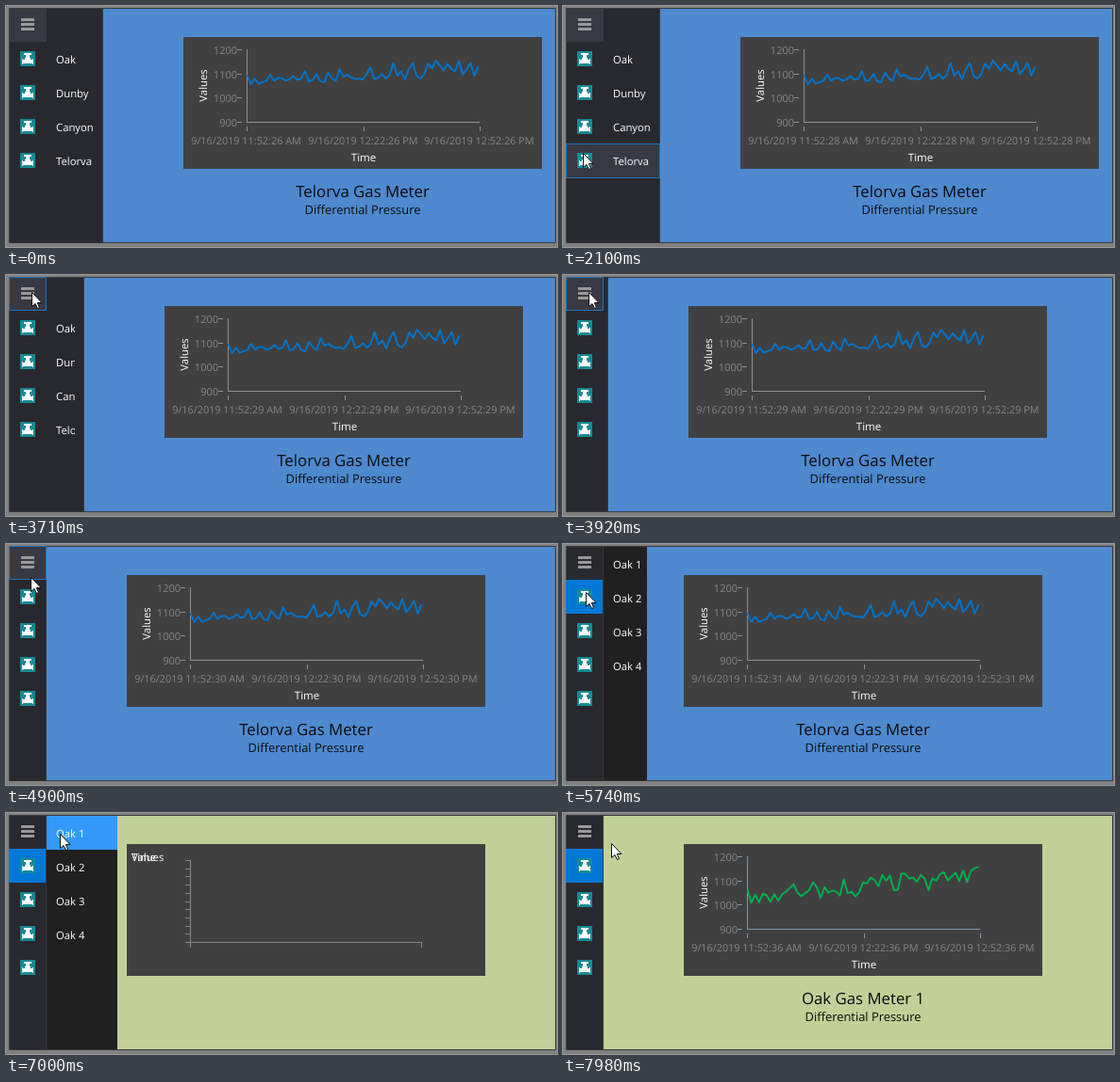
Write an HTML page with a canvas that moves like this. It is 584 px wide and 256 px high and loops after 8 s.

```html
<!DOCTYPE html>
<html lang="en">
<head>
<meta charset="utf-8">
<title>Gas meter dashboard</title>
<style>
html, body { margin: 0; width: 100%; height: 100%; overflow: hidden; background: #808080; }
canvas { display: block; width: 584px; height: 256px; }
</style>
</head>
<body>
<canvas id="stage" width="584" height="256"></canvas>
<script>
const ctx = document.getElementById('stage').getContext('2d');
ctx.textRendering = 'geometricPrecision';

const LOOP = 8000, STEP = 70;
const FONT = '"Open Sans", "Noto Sans", sans-serif';
const SITES = ['Oak', 'Dunby', 'Canyon', 'Telorva'];
const ROW = 36, RAIL = 43, WIDE = 103, MENU = 75;
const BLUE = '#0078d7', GREY = '#868686';

// Times of the events, in ms
const ENTER = 1890, COLLAPSE = 3640, SELECT = 5460, OPEN = 5530, PRESS = 7000, LOAD = 7140;

// Pointer moves: start, end, target x, target y
const MOVES = [
  [1890, 2100, 21, 156], [2100, 2730, 38, 56], [2730, 3360, 27, 18],
  [4620, 5180, 24, 51], [5950, 6440, 57, 22], [7840, 7980, 51, 32],
];

const mix = (a, b, u) => a + (b - a) * u;
const progress = (t, start, length) => Math.min(1, Math.max(0, (t - start) / length));

// One sample per minute: a rising trend with seeded noise
function samples(seed, from, to, calm, wild) {
  return Array.from({ length: 61 }, (_, i) => {
    seed = (seed * 16807) % 2147483647;
    const u = i / 60, noise = seed / 2147483647 * 2 - 1;
    return mix(from, to, u) + noise * mix(calm, wild, u);
  });
}
const BLUE_DATA = samples(4127, 79, 64, 6, 11);
const GREEN_DATA = samples(911, 90, 66, 9, 12);

function pointerAt(t) {
  let x = 5, y = 167;
  for (const [start, end, tx, ty] of MOVES) {
    const u = progress(t, start, end - start);
    x = mix(x, tx, u);
    y = mix(y, ty, u);
  }
  return { x: Math.round(x), y: Math.round(y), shown: t >= ENTER };
}

function sideEdge(t) {
  return Math.round(mix(RAIL, WIDE, (1 - progress(t, COLLAPSE, 420)) ** 2.25));
}

function menuEdge(t) {
  const open = progress(t, OPEN, 280) ** 1.7;
  const close = progress(t, LOAD, 280) ** 1.7;
  return Math.round(RAIL + MENU * (open - close));
}

function rect(x, y, w, h, color) {
  ctx.fillStyle = color;
  ctx.fillRect(x, y, w, h);
}

function frame(x, y, w, h, color) {
  ctx.strokeStyle = color;
  ctx.lineWidth = 1;
  ctx.strokeRect(x + .5, y + .5, w - 1, h - 1);
}

function hover(x, y, w, h) {
  rect(x, y, w, h, '#383942');
  frame(x, y, w, h, '#1f74bf');
}

function text(str, x, y, size, color, align = 'left') {
  ctx.font = `${size}px ${FONT}`;
  ctx.textAlign = align;
  ctx.fillStyle = color;
  ctx.fillText(str, x, y);
}

function clipped(x, y, w, h, draw) {
  if (w <= 0) return;
  ctx.save();
  ctx.beginPath();
  ctx.rect(x, y, w, h);
  ctx.clip();
  draw();
  ctx.restore();
}

function valve(x, y) {
  rect(x, y, 16, 16, '#158b94');
  rect(x + 4, y + 2, 8, 2, '#fff');
  rect(x + 6, y + 4, 4, 3, '#fff');
  rect(x + 5, y + 7, 6, 6, '#fff');
  rect(x + 3, y + 9, 10, 4, '#fff');
  rect(x + 2, y + 8, 1, 6, '#d5eef0');
  rect(x + 13, y + 8, 1, 6, '#d5eef0');
}

function drawPointer({ x, y }) {
  ctx.save();
  ctx.translate(x + .5, y + .5);
  ctx.beginPath();
  for (const [px, py] of [[0, 0], [0, 15], [3.5, 12], [6, 17], [8, 16], [5.8, 11], [10.5, 11]]) ctx.lineTo(px, py);
  ctx.closePath();
  ctx.fillStyle = '#fff';
  ctx.strokeStyle = '#111';
  ctx.lineWidth = 1;
  ctx.fill();
  ctx.stroke();
  ctx.restore();
}

function emptyChart(x) {
  const left = x + 67;
  text('Values', x + 5, 51, 11.3, '#fff');
  text('Time', x + 5, 51, 11.3, '#fff');
  rect(left, 50, 1, 93, GREY);
  rect(left, 137, 246, 1, GREY);
  rect(left + 245, 137, 1, 6, GREY);
  for (let i = 0; i <= 10; i++) rect(left - 5, Math.round(50 + i * 8.7), 5, 1, GREY);
}

function chart(x, data, color, axis, second) {
  const left = x + 67;
  rect(left, 46, 1, 78, axis);
  rect(left, 123, 247, 1, axis);
  for (let i = 0; i < 4; i++) {
    const y = Math.round(46 + i * 25.6);
    rect(left - 10, y, 5, 1, axis);
    text(1200 - i * 100, left - 10, y + 5, 11, GREY, 'right');
  }
  ['11:52', '12:22', '12:52'].forEach((time, i) => {
    const tx = left + Math.round(i * 123.5);
    rect(tx, 128, 1, 5, axis);
    text(`9/16/2019 ${time}:${second} ${i ? 'PM' : 'AM'}`, tx - .5, 147, 10.85, GREY, 'center');
  });
  text('Time', x + 191, 165, 11.5, '#fff', 'center');
  ctx.save();
  ctx.translate(x + 25, 84.5);
  ctx.rotate(-Math.PI / 2);
  text('Values', 0, 0, 11.3, '#fff', 'center');
  ctx.restore();

  ctx.beginPath();
  data.forEach((y, i) => ctx.lineTo(left + .5 + i * 245 / (data.length - 1), y));
  ctx.strokeStyle = color;
  ctx.lineWidth = 2;
  ctx.lineJoin = 'round';
  ctx.stroke();
}

function content(t, side) {
  const x = side + 85, pressed = t >= PRESS, loaded = t >= LOAD;
  const second = 26 + Math.floor((t + 570) / 1170);
  rect(side, 3, 582 - side, 248, pressed ? '#c2d098' : '#4e89d0');
  rect(x, 33, 380, 140, '#404040');
  if (pressed && !loaded) return emptyChart(x);
  if (loaded) chart(x, GREEN_DATA, '#00ad4f', '#7f9aa8', second + 3);
  else chart(x, BLUE_DATA, '#0072c6', '#909090', second);
  const title = loaded ? `${SITES[0]} Gas Meter 1` : `${SITES[3]} Gas Meter`;
  text(title, x + 190, 203, 16.8, '#0a0a0a', 'center');
  text('Differential Pressure', x + 190, 221, 12.9, '#0a0a0a', 'center');
}

function sidebar(t, side, pointer) {
  const inside = pointer.shown && pointer.x < side;
  rect(4, 3, side - 4, 248, '#28292f');
  rect(side - 1, 3, 1, 248, '#38393e');

  if (inside && pointer.x < RAIL && pointer.y < 38) hover(3, 2, 40, 36);
  else if (side > RAIL) rect(4, 3, 39, 35, '#383a43');
  for (let i = 0; i < 3; i++) rect(16, 13 + i * 5, 14, 3, '#999');

  SITES.forEach((name, i) => {
    const top = 38 + i * ROW;
    if (i === 0 && t >= SELECT) rect(3, top, 39, ROW, BLUE);
    else if (inside && pointer.y >= top && pointer.y < top + ROW) hover(3, top, side - 3, ROW + 1);
    valve(15, top + 10);
    clipped(4, top, side - 14, ROW, () => text(name, 53, top + 23, 11.3, '#fff'));
  });
}

function submenu(t, edge, pointer) {
  clipped(RAIL, 3, edge - RAIL, 248, () => {
    rect(RAIL, 3, MENU, 248, '#202020');
    for (let i = 0; i < 4; i++) {
      const top = 3 + i * ROW;
      const over = pointer.x >= RAIL && pointer.y >= top && pointer.y < top + ROW;
      if (i === 0 && t >= PRESS) rect(RAIL, top, MENU, ROW, '#3399fa');
      else if (over) hover(RAIL, top, MENU, ROW);
      text(`${SITES[0]} ${i + 1}`, 53, top + 23, 11.3, '#fff');
    }
  });
}

function render(now) {
  const t = Math.floor(now % LOOP / STEP) * STEP;
  const side = sideEdge(t), pointer = pointerAt(t);
  rect(0, 0, 584, 256, '#808080');
  frame(3, 2, 580, 250, '#3a3a3a');
  content(t, side);
  sidebar(t, side, pointer);
  submenu(t, menuEdge(t), pointer);
  if (pointer.shown) drawPointer(pointer);
}

const start = performance.now();
function tick() {
  render(performance.now() - start);
  requestAnimationFrame(tick);
}
tick();
</script>
</body>
</html>
```
